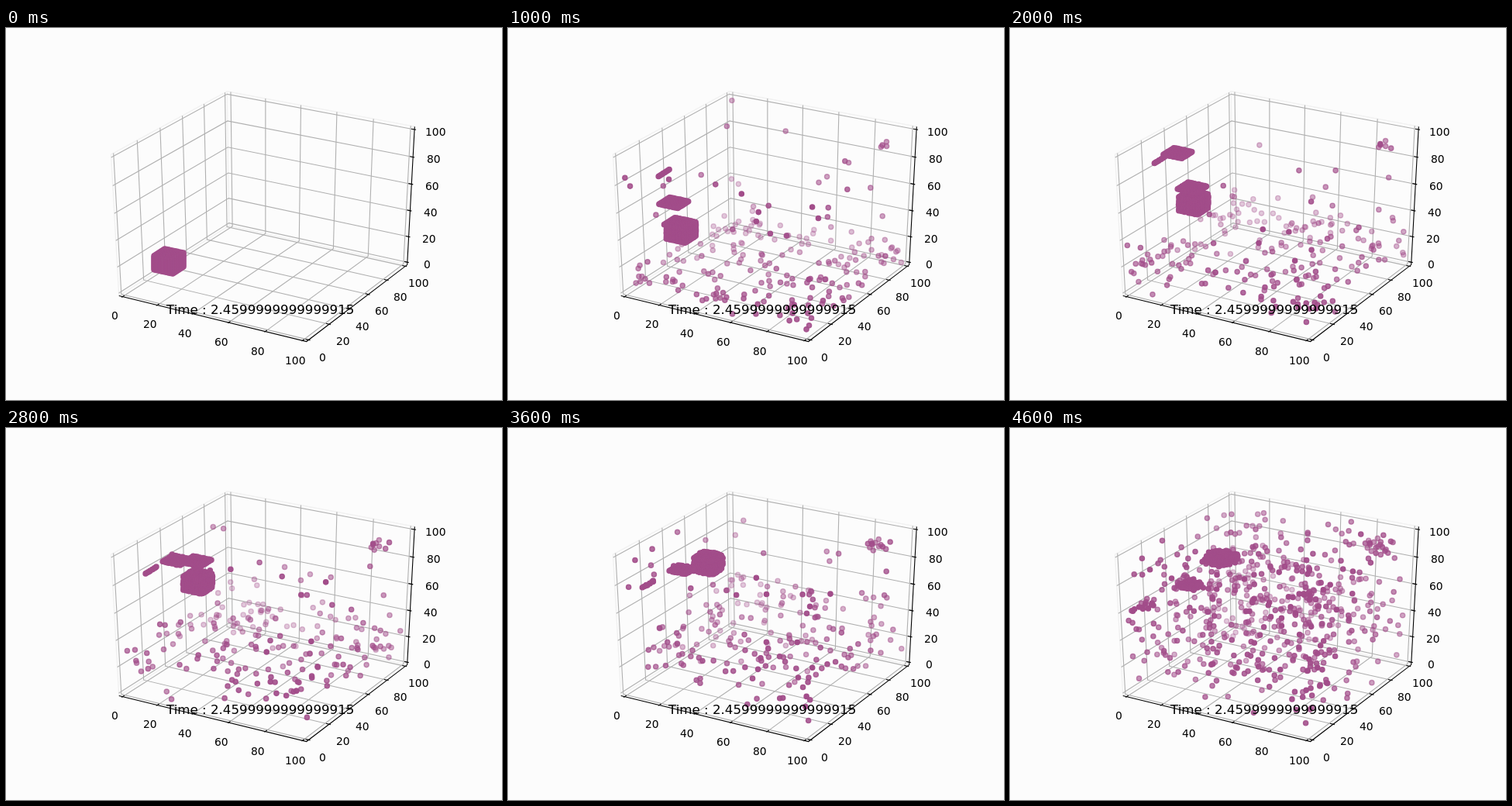
Recreate the animation shown at these times as an HTML page with a canvas. Size 640 px wide and 480 px high, loop 4800 ms.

```html
<!DOCTYPE html>
<html>
<head>
<meta charset="utf-8">
<style>
html, body { margin: 0; width: 640px; height: 480px; overflow: hidden; background: #fcfcfc; }
canvas, svg { position: absolute; left: 0; top: 0; }
text { font-family: "DejaVu Sans", sans-serif; font-size: 13.89px; fill: #000; }
</style>
</head>
<body>
<canvas id="plot" width="640" height="480"></canvas>
<svg id="labels" width="640" height="480"></svg>
<script>
const ctx = document.getElementById('plot').getContext('2d');
const svg = document.getElementById('labels');
const STEP = 200, FRAMES = 24, COLOR = '#a24d8a';
const LO = -100 / 48, HI = 100 - LO;
const C30 = Math.sqrt(3) / 2;
const clamp = (v, lo, hi) => Math.max(lo, Math.min(hi, v));

// Perspective view, azimuth -60, elevation 30, data range 0..100
function project(x, y, z) {
  x = x / 100 - 0.5; y = y / 100 - 0.5; z = z / 100 - 0.5;
  const front = 0.5 * x - C30 * y;
  const depth = 10 - (C30 * front + 0.5 * z);
  return [
    334.7 + 2681 * (C30 * x + 0.5 * y) / depth,
    237.4 - 1998 * (C30 * z - 0.5 * front) / depth,
    depth
  ];
}

function line(color, width, ...pts) {
  ctx.strokeStyle = color;
  ctx.lineWidth = width;
  ctx.beginPath();
  for (const p of pts) ctx.lineTo(...project(...p).slice(0, 2));
  ctx.stroke();
}

function label(str, x, y, size = 13.89) {
  const el = document.createElementNS('http://www.w3.org/2000/svg', 'text');
  el.style.fontSize = size + 'px';
  el.textContent = str;
  svg.appendChild(el);
  el.setAttribute('x', Math.round(x - el.getComputedTextLength() / 2));
  el.setAttribute('y', y);
}

const ticks = Array.from({ length: 6 }, (_, i) => 20 * i);

function drawAxes() {
  const pane = '#f1f1f1', grid = '#b0b0b0', w = 1.11;
  line(pane, 1.4, [LO, LO, LO], [LO, LO, HI], [LO, HI, HI], [HI, HI, HI]);
  line(pane, 1.4, [LO, LO, LO], [LO, HI, LO], [HI, HI, LO]);
  line(pane, 1.4, [LO, HI, LO], [LO, HI, HI]);
  for (const t of ticks) {
    line(grid, w, [t, LO, LO], [t, HI, LO], [t, HI, HI]);
    line(grid, w, [HI, t, LO], [LO, t, LO], [LO, t, HI]);
    line(grid, w, [LO, LO, t], [LO, HI, t], [HI, HI, t]);
  }
  line('#000', w, [LO, LO, LO], [HI, LO, LO], [HI, HI, LO], [HI, HI, HI]);
  for (const t of ticks) {
    line('#000', w, [t, LO - 0.83, LO], [t, LO + 1.67, LO]);
    line('#000', w, [HI + 0.83, t, LO], [HI - 1.67, t, LO]);
    line('#000', w, [HI + 0.83, HI, t], [HI - 1.67, HI, t]);
  }
}

function addLabels() {
  const a = LO - 7.38, b = HI + 7.38;
  for (const t of ticks)
    for (const p of [[t, a, a], [b, t, a], [b, b, t]]) {
      const [x, y] = project(...p);
      label(t, x + 0.5, Math.floor(y + 10.9));
    }
  label('Time : 2.4599999999999915', 328, 369, 16.67);
}

function dot(x, y, alpha) {
  ctx.globalAlpha = alpha;
  ctx.beginPath();
  ctx.arc(x, y, 3.1, 0, 2 * Math.PI);
  ctx.fill();
  ctx.stroke();
}

function rng(seed) {
  return () => {
    seed = (Math.imul(seed, 1664525) + 1013904223) >>> 0;
    return seed / 4294967296;
  };
}
const bell = r => r() + r() + r() - 1.5;

// The block and the layers that peel off it; each rises, then rests or rebounds
const clumps = [
  { n: [10, 10, 10], from: 0, shrink: 1e-5, fuzz: 0.07,
    path: t => [210 + 2.68 * t, Math.max(168, 301 - 8.3 * t + 0.07 * t * t)] },
  { n: [10, 10, 1], from: 1, shrink: 3e-5, fuzz: 0.07,
    path: t => [213 + 0.035 * t * t, Math.max(298 - 14.5 * t, 152 + 0.095 * t * t)] },
  { n: [10, 10, 1], from: 1, shrink: 2e-5, fuzz: 0.07,
    path: t => [206 + 2.9 * t, Math.max(166, 301 - 10.2 * t + 0.07 * t * t)] },
  { n: [1, 10, 1], from: 1, shrink: 0, fuzz: 0.16,
    path: t => [209 - 1.55 * t, Math.max(301 - 22.8 * t, 156 + 0.14 * t * t)] }
];

function drawClump({ n, from, shrink, fuzz, path }, t) {
  if (t < from) return;
  const [cx, cy] = path(t), r = rng(77);
  const step = 1.15 * (1 - shrink * t ** 3);
  const tall = clamp(10 - t / 2, 0.15, 1);
  const jit = 0.03 * t + fuzz * Math.max(0, t - 16) ** 2;
  const at = (i, k) => (i - (n[k] - 1) / 2) * step;
  for (let i = 0; i < n[0]; i++)
    for (let j = 0; j < n[1]; j++)
      for (let k = 0; k < n[2]; k++) {
        const x = at(i, 0), y = at(j, 1), z = at(k, 2) * tall;
        dot(cx + 2.68 * (C30 * x + 0.5 * y) + 1.6 * bell(r) * jit,
            cy + 2 * (0.25 * x - 0.433 * y - C30 * z) + bell(r) * jit, 1);
      }
}

// Fast loose particles, bouncing between the walls
const rand = rng(2459);
const loose = Array.from({ length: 600 }, (_, i) => ({
  kind: i < 160 ? 'layer' : i < 215 ? 'high' : 'late',
  u: 2 * rand(), v: 2 * rand(), w: 2 * rand(),
  du: rand() - 0.5, dv: rand() - 0.5, dw: 0.12 * (rand() - 0.5),
  g: bell(rand), edge: rand()
}));

function fold(v) {
  v = Math.abs(v) % 2;
  return v > 1 ? 2 - v : v;
}

// Position between two walls, drawn towards them by `edge`
function wall(v, edge) {
  const f = fold(v + 20);
  return 100 * (f + edge * (0.5 - 0.5 * Math.cos(Math.PI * f) - f));
}

function place(p, t) {
  const edge = p.kind === 'late' ? 0 : p.edge;
  const x = wall(p.u + p.du * t, edge), y = wall(p.v + p.dv * t, edge);
  const bounce = fold(p.w + p.dw * t + 20);
  const z = p.kind === 'layer' ? 100 * fold((1.75 * t + p.g * (8 + 1.3 * Math.max(0, t - 9))) / 100)
    : p.kind === 'high' ? bounce * (t > 5 && t < 13 ? 76 : 99)
    : 100 * bounce ** 0.7;
  return project(x, y, z);
}

function drawLoose(t) {
  if (t < 2) return;
  const late = Math.max(0, t - 17) ** 2 * 10;
  loose.slice(0, 215 + late)
    .map(p => place(p, t))
    .sort((a, b) => b[2] - a[2])
    .forEach(([x, y, d]) => dot(x, y, clamp(1 - 0.7 * (d - 9.5) / 1.05, 0.3, 1)));
}

function drawCloud(cx, cy, count, spread, seed) {
  const r = rng(seed);
  for (let i = 0; i < count; i++)
    dot(cx + bell(r) * spread, cy + bell(r) * spread, 0.55 + 0.4 * r());
}

function draw(t) {
  ctx.globalAlpha = 1;
  ctx.fillStyle = '#fcfcfc';
  ctx.fillRect(0, 0, 640, 480);
  drawAxes();
  ctx.fillStyle = ctx.strokeStyle = COLOR;
  ctx.lineWidth = 1.39;
  drawLoose(t);
  if (t > 1) {
    drawCloud(492 - 0.8 * t, 152, 3 + t * t / 35, 8 + t / 2, 11);
    drawCloud(386, 220, t * t / 35 - 4, 8 + t / 2, 61);
  }
  clumps.forEach(c => drawClump(c, t));
}

let shown = -1;
const start = performance.now();
function tick() {
  const t = Math.floor((performance.now() - start) / STEP) % FRAMES;
  if (t !== shown) draw(shown = t);
  requestAnimationFrame(tick);
}
addLabels();
tick();
</script>
</body>
</html>
```
